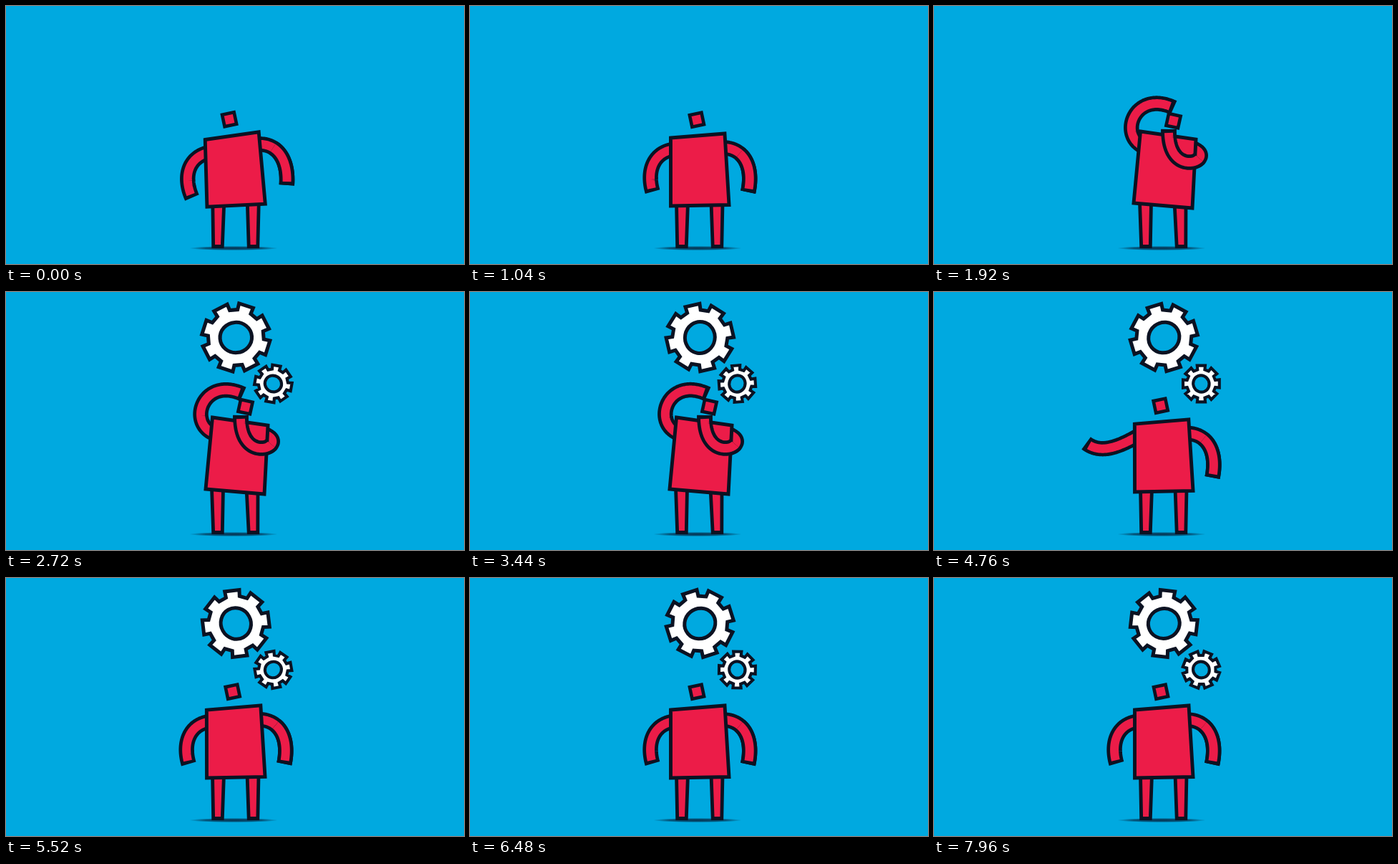
Animation, 640 px wide and 360 px high, one loop 8 s. Source, as an HTML page with a canvas:

```html
<!DOCTYPE html>
<html lang="en">
<head>
<meta charset="utf-8">
<title>Thinking</title>
<style>
  html, body { margin: 0; width: 100%; height: 100%; overflow: hidden; background: #00a9e0; }
  canvas { display: block; width: 640px; height: 360px; }
</style>
</head>
<body>
<canvas id="stage" width="640" height="360"></canvas>
<script>
const LOOP = 8000, STEP = 40;
const SKY = '#00a9e0', RED = '#ec1c48', INK = '#0b1222', WHITE = '#fff';
const ctx = document.getElementById('stage').getContext('2d');

// Key curves from shoulder to hand; each arm passes through its three in order
const LEFT = [
  [[286, 200], [258, 203], [246, 228], [255, 259]],
  [[288, 199], [258, 214], [236, 210], [217, 186]],
  [[292, 196], [257, 178], [282, 117], [335, 142]]
];
const RIGHT = [
  [[356, 198], [384, 200], [396, 226], [388.5, 260]],
  [[360, 198], [400, 210], [353, 258], [324, 214]],
  [[360, 198], [401, 212], [326, 246], [328, 172]]
];
const CHEST = [318, 228];

const rad = deg => deg * Math.PI / 180;
const polar = (deg, r) => [r * Math.cos(rad(deg)), r * Math.sin(rad(deg))];

// Smooth 0 to 1 between two times
function ramp(t, from, to) {
  const u = Math.min(1, Math.max(0, (t - from) / (to - from)));
  return u * u * (3 - 2 * u);
}

// Parabola through three key curves, s from 0 to 2
function through([a, b, c], s) {
  const wa = (1 - s) * (2 - s) / 2, wb = s * (2 - s), wc = s * (s - 1) / 2;
  return a.map((p, i) => p.map((v, k) => wa * v + wb * b[i][k] + wc * c[i][k]));
}

function rotate([x, y], [cx, cy], deg) {
  const c = Math.cos(rad(deg)), s = Math.sin(rad(deg));
  return [cx + (x - cx) * c - (y - cy) * s, cy + (x - cx) * s + (y - cy) * c];
}

function shape(points, fill, width) {
  ctx.beginPath();
  points.forEach(p => ctx.lineTo(...p));
  ctx.closePath();
  ctx.fillStyle = fill;
  ctx.fill();
  ctx.strokeStyle = INK;
  ctx.lineWidth = width;
  ctx.stroke();
}

function trace(points, color, width) {
  ctx.beginPath();
  points.forEach(p => ctx.lineTo(...p));
  ctx.strokeStyle = color;
  ctx.lineWidth = width;
  ctx.lineJoin = 'round';
  ctx.stroke();
  ctx.lineJoin = 'miter';
}

function curvePoint([a, b, c, d], u) {
  const v = 1 - u;
  return a.map((_, k) => v ** 3 * a[k] + 3 * v * v * u * b[k] + 3 * v * u * u * c[k] + u ** 3 * d[k]);
}

function arm(curve, start = 0) {
  const points = Array.from({ length: 61 }, (_, i) => curvePoint(curve, start + (1 - start) * i / 60));
  const [hx, hy] = points[60];
  trace(points, INK, 21.4);
  trace(points.filter(([x, y]) => Math.hypot(x - hx, y - hy) > 4.6), RED, 12);
}

function leg(hip, foot) {
  shape([[hip - 8, 274], [hip + 8, 274], [foot + 6.3, 335.5], [foot - 6.3, 335.5]], RED, 4.8);
}

function torso(lean) {
  shape([
    [280.5 + 8 * lean, 184 - 9 * lean], [356 + 10 * lean, 178 + 8 * lean],
    [362 - lean, 277.5 + 4.5 * lean], [280.5 - 1.5 * lean, 279 - 4 * lean]
  ], RED, 4.9);
}

function head(lean) {
  const x = 317 + 17.5 * lean, y = 158.7 + 1.5 * lean;
  const tilt = -12 + 24.5 * Math.max(0, lean);
  shape([45, 135, 225, 315].map(a => {
    const [dx, dy] = polar(a + tilt, 12);
    return [x + dx, y + dy];
  }), RED, 4.6);
}

function gear(x, y, scale, turn, outer, root, hole, width) {
  if (scale <= 0) return;
  ctx.save();
  ctx.translate(x, y);
  ctx.scale(scale, scale);
  ctx.rotate(rad(turn - 90));
  const rim = [];
  for (let a = 0; a < 360; a += 45) {
    rim.push(polar(a - 14.3, root), polar(a - 12.5, outer), polar(a + 12.5, outer), polar(a + 14.3, root));
  }
  shape(rim, WHITE, width);
  ctx.beginPath();
  ctx.ellipse(0, 0, hole, hole * 0.95, 0.4, 0, Math.PI * 2);
  ctx.fillStyle = SKY;
  ctx.fill();
  ctx.stroke();
  ctx.restore();
}

function shadow() {
  ctx.save();
  ctx.translate(318, 338);
  ctx.scale(62, 3);
  const g = ctx.createRadialGradient(0, 0, 0, 0, 0, 1);
  g.addColorStop(0, 'rgba(6,30,56,.85)');
  g.addColorStop(0.65, 'rgba(6,30,56,.6)');
  g.addColorStop(1, 'rgba(6,30,56,0)');
  ctx.fillStyle = g;
  ctx.fillRect(-1, -1, 2, 2);
  ctx.restore();
}

// Growth with a slight overshoot
function pop(t, start) {
  const u = Math.min(1, (t - start) / 600) - 1;
  return u <= -1 ? 0 : 1 + 1.6 * u ** 3 + 0.6 * u ** 2;
}

function draw(t) {
  const sway = 1 - ramp(t, 600, 1080) + ramp(t, 4680, 5080) - ramp(t, 5080, 5600);
  const lean = ramp(t, 1160, 1760) - ramp(t, 4140, 4800) - 0.28 * sway;
  const lift = 2 * (ramp(t, 1080, 1840) - ramp(t, 4160, 5120));
  const fold = 2 * (ramp(t, 1160, 1880) - ramp(t, 3840, 4400));
  const atHead = ramp(t, 1900, 1940) - ramp(t, 3960, 4120);
  const rub = atHead * (1 - Math.cos((t - 1920) / 468 * Math.PI * 2));

  const swayed = p => rotate(p, CHEST, -8 * sway);
  const leftArm = through(LEFT, lift).map(swayed).map(([x, y]) => [x - 3 * rub, y + 0.5 * rub]);
  const rightArm = through(RIGHT, fold).map(swayed);

  ctx.fillStyle = SKY;
  ctx.fillRect(0, 0, 640, 360);
  shadow();
  leg(296.5 - lean, 296);
  leg(345 - lean, 345.5);
  arm(leftArm);
  arm(rightArm);
  torso(lean);
  arm(rightArm, 0.3);   // forearm passes in front of the body
  head(lean);

  const spin = 105.2 * (t - 3440) / 1000;
  gear(321.3, 63.5, pop(t, 2250), -13 - spin, 47.2, 38.5, 22, 5);
  gear(373.4, 128, pop(t, 2290), spin - 4, 26, 20.3, 11.7, 4.1);
}

const origin = performance.now();
function tick() {
  const t = (performance.now() - origin) % LOOP;
  draw(Math.floor(t / STEP) * STEP);
  requestAnimationFrame(tick);
}
tick();
</script>
</body>
</html>
```
